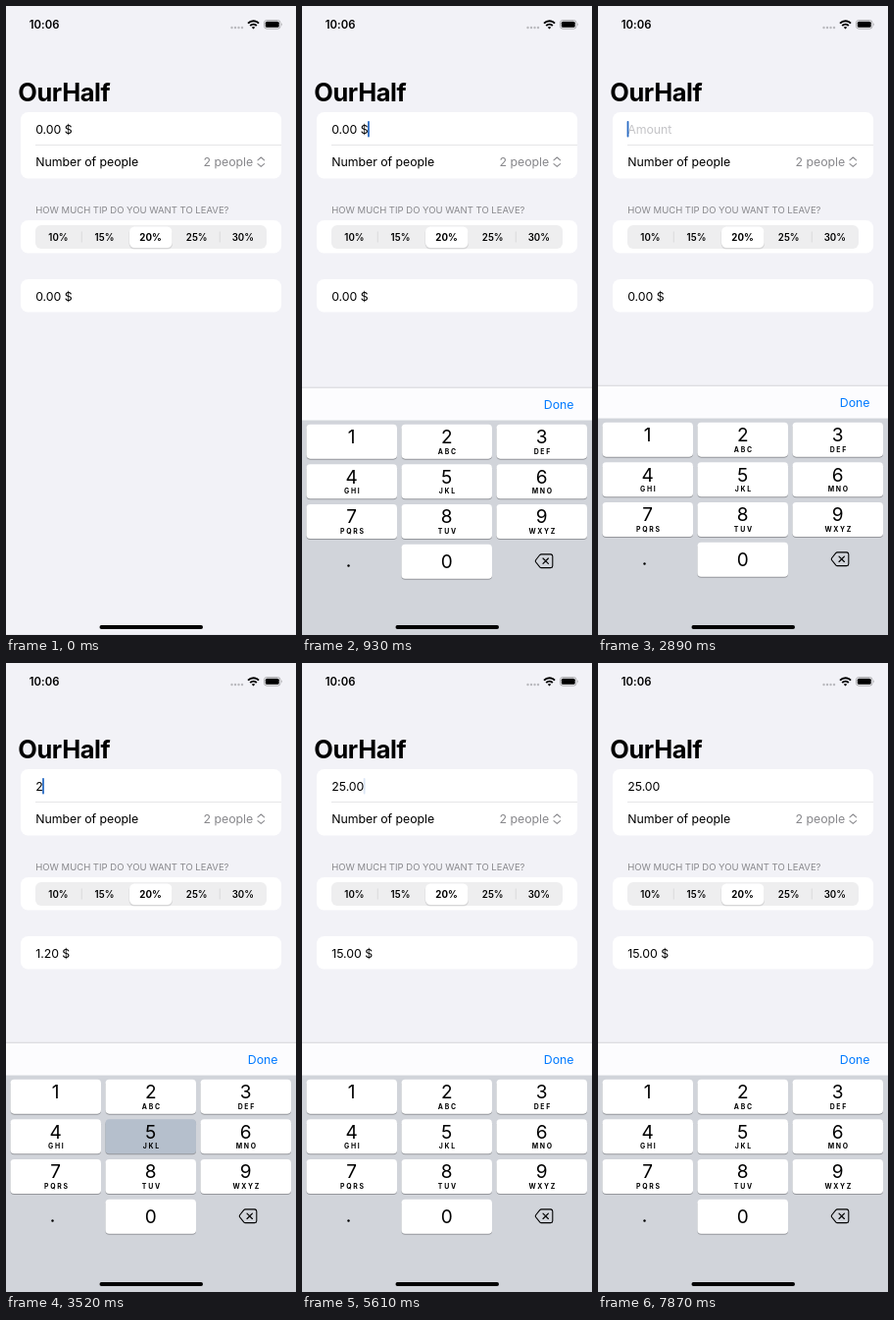
Animation, 296 px wide and 640 px high, one loop 7990 ms. Source, as an HTML page:

```html
<!DOCTYPE html>
<html lang="en">
<head>
<meta charset="utf-8">
<title>Bill splitter</title>
<style>
html, body { margin: 0; width: 100%; height: 100%; overflow: hidden; background: #f2f2f7; }
svg { display: block; width: 296px; height: 640px; font-family: Inter, "Liberation Sans", sans-serif; }
text { white-space: pre; }
.body { font-size: 12.35px; letter-spacing: -.04px; }
.grey { fill: #88888c; }
.seg { font-size: 9.7px; font-weight: 600; text-anchor: middle; }
.seg.on { font-weight: 700; }
.digit { font-size: 19px; text-anchor: middle; }
.abc { font-size: 6.9px; font-weight: 700; text-anchor: middle; letter-spacing: 1.7px; }
</style>
</head>
<body>
<svg id="stage" viewBox="0 0 296 640">
  <rect width="296" height="640" fill="#f2f2f7"/>
  <text x="23.7" y="23" font-size="11.3" font-weight="600" letter-spacing=".1">10:06</text>
  <g fill="#b9b9be">
    <circle cx="230.5" cy="22" r="1.2"/><circle cx="234" cy="22" r="1.2"/>
    <circle cx="237.5" cy="22" r="1.2"/><circle cx="241" cy="22" r="1.2"/>
  </g>
  <g fill="none" stroke="#000" stroke-width="1.9">
    <path d="M247 17.6a7.6 7.6 0 0 1 11 0M249.2 20a4.7 4.7 0 0 1 6.6 0"/>
    <path d="M252.5 23.6l-1.7-1.9a2.5 2.5 0 0 1 3.4 0z" fill="#000" stroke="none"/>
  </g>
  <rect x="263.5" y="14.5" width="16.5" height="8.6" rx="2.6" fill="none" stroke="#a5a5a8" stroke-width=".9"/>
  <rect x="264.8" y="15.8" width="13.9" height="6" rx="1.5"/>
  <path d="M281.2 17.3q1.6 1.5 0 3z" fill="#a5a5a8"/>

  <text x="12.3" y="96.6" font-size="25.4" font-weight="700" letter-spacing="-.4">OurHalf</text>

  <g fill="#fff">
    <rect x="15" y="108" width="266" height="67.5" rx="7.6"/>
    <rect x="15" y="218" width="266" height="33.5" rx="7.6"/>
    <rect x="15" y="278" width="266" height="33.5" rx="7.6"/>
  </g>
  <path d="M30 141.5H281" stroke="#dcdcdf" stroke-width=".7"/>
  <text id="amount" class="body" x="30.2" y="130.2"></text>
  <rect id="caret" y="117" width="1.8" height="16.5" rx=".8" fill="#2a6cc4"/>
  <text class="body" x="30.2" y="163.4">Number of people</text>
  <text class="body grey" x="252.2" y="163.4" text-anchor="end">2 people</text>
  <path d="M257 156.8l3.3-2.8 3.3 2.8M257 160.6l3.3 2.8 3.3-2.8" fill="none" stroke="#88888c" stroke-width="1.1" stroke-linecap="round" stroke-linejoin="round"/>
  <text class="grey" x="30.2" y="211" font-size="9.5">HOW MUCH TIP DO YOU WANT TO LEAVE?</text>
  <rect x="30" y="223" width="236" height="24" rx="6" fill="#eeeeef"/>
  <path d="M77.3 229.5v11M218.3 229.5v11" stroke="#d6d6d9" stroke-width=".8"/>
  <rect x="125.6" y="225.5" width="44.4" height="22" rx="5.4" fill="#000" opacity=".1"/>
  <rect x="126" y="224.4" width="43.6" height="21.6" rx="5.2" fill="#fff"/>
  <g id="tips"></g>
  <text id="share" class="body" x="30.2" y="299.7"></text>

  <g id="pad">
    <rect y="386" width="296" height="300" fill="#d1d4da"/>
    <rect y="386" width="296" height="33.5" fill="#fcfcfe"/>
    <path d="M0 386.2H296" stroke="#cdcdd2" stroke-width=".8"/>
    <text class="body" x="246.8" y="407.9" fill="#007aff">Done</text>
    <g id="keys"></g>
    <circle cx="47.5" cy="567.4" r="1.2"/>
    <path id="del" d="M244.4 555.8H253.6Q255.8 555.8 255.8 558V567.4Q255.8 569.6 253.6 569.6H244.4Q243.4 569.6 242.7 568.9L238.6 563.7Q238 562.7 238.6 561.7L242.7 556.5Q243.4 555.8 244.4 555.8Z" stroke="#000" stroke-width="1.1"/>
    <path id="cross" d="M246 560l5.4 5.4M251.4 560l-5.4 5.4" stroke-width="1.2" stroke-linecap="round"/>
  </g>
  <rect x="95.5" y="630.1" width="105.5" height="3.8" rx="1.9"/>
</svg>
<script>
const LOOP = 7990;
const $ = id => document.getElementById(id);

function add(parent, tag, attrs, label) {
  const el = document.createElementNS("http://www.w3.org/2000/svg", tag);
  for (const k in attrs) el.setAttribute(k, attrs[k]);
  if (label) el.textContent = label;
  parent.appendChild(el);
  return el;
}

["10%", "15%", "20%", "25%", "30%"].forEach((tip, i) =>
  add($("tips"), "text", { class: i === 2 ? "seg on" : "seg", x: 53.4 + i * 47.1, y: 238.8 }, tip));

const caps = {};
const letters = ["", "ABC", "DEF", "GHI", "JKL", "MNO", "PQRS", "TUV", "WXYZ"];
function addKey(digit, col, row, abc) {
  const x = 4.5 + col * 97, y = 423.6 + row * 40.7, mid = x + 46.2;
  add($("keys"), "rect", { x, y: y + 1, width: 92.5, height: 35, rx: 3.8, fill: "#95979c" });
  caps[digit] = add($("keys"), "rect", { x, y, width: 92.5, height: 35, rx: 3.8 });
  add($("keys"), "text", { class: "digit", x: mid, y: y + (digit ? 19.4 : 24) }, String(digit));
  if (abc) add($("keys"), "text", { class: "abc", x: mid + 1.1, y: y + 30 }, abc);
}
letters.forEach((abc, i) => addKey(i + 1, i % 3, Math.floor(i / 3), abc));
addKey(0, 1, 3);

// time, typed text, caret opacity, pressed key
const steps = [
  [0, "0.00 $", 0], [500, "0.00 $", 1], [1030, "0.00 $", .6], [1150, "0.00 $", .15],
  [1420, "0.00 $", 0], [1540, "0.00 $", 1], [1970, "0.00 $", 1, "del"],
  [2090, "0.00 ", 1, "del"], [2240, "0.00", 1, "del"], [2350, "0.0", 1, "del"],
  [2460, "0.", 1, "del"], [2570, "0.", 1], [2730, "0", 1], [2890, "", 1],
  [3250, "", 1, "2"], [3520, "2", 1, "5"], [3630, "25", 1, "5"], [3850, "25", 1],
  [4130, "25.", 1], [4700, "25.", .4], [4800, "25.", 0, "0"], [4950, "25.0", 1],
  [5190, "25.00", 1]
];
const lastTap = 5190;

// blink after typing has ended
function blink(t) {
  const p = (t - 5470 + 1020) % 1020;
  if (t < 5610 || p >= 480) return 1;
  return p < 140 ? .6 : p < 360 ? .17 : 0;
}

function rise(t) {
  let held = 0;
  for (const at of [500, 610, 720, 830, 930, 1030, 1150]) if (t >= at) held = at;
  const w = Math.max(0, held - 549) * .0181;
  return 254 * (1 + w) * Math.exp(-w);
}

function render(t) {
  let s = steps[0];
  for (const step of steps) if (t >= step[0]) s = step;
  const [, typed, alpha, pressed] = s;

  $("amount").textContent = typed || "Amount";
  $("amount").setAttribute("fill", typed ? "#000" : "#c4c4c7");
  const end = typed ? $("amount").getComputedTextLength() : 0;
  $("caret").setAttribute("x", 29.6 + end);
  $("caret").setAttribute("opacity", t >= lastTap ? blink(t) : alpha);

  const bill = t < 3520 ? 0 : parseFloat(typed);
  $("share").textContent = (bill * 1.2 / 2).toFixed(2) + " $";

  for (const d in caps) caps[d].setAttribute("fill", d === pressed ? "#b5bfcc" : "#fff");
  $("del").setAttribute("fill", pressed === "del" ? "#000" : "none");
  $("cross").setAttribute("stroke", pressed === "del" ? "#fff" : "#000");
  $("pad").setAttribute("transform", `translate(0 ${rise(t).toFixed(2)})`);
}

const start = performance.now();
function tick() {
  render((performance.now() - start) % LOOP);
  requestAnimationFrame(tick);
}
tick();
</script>
</body>
</html>
```
